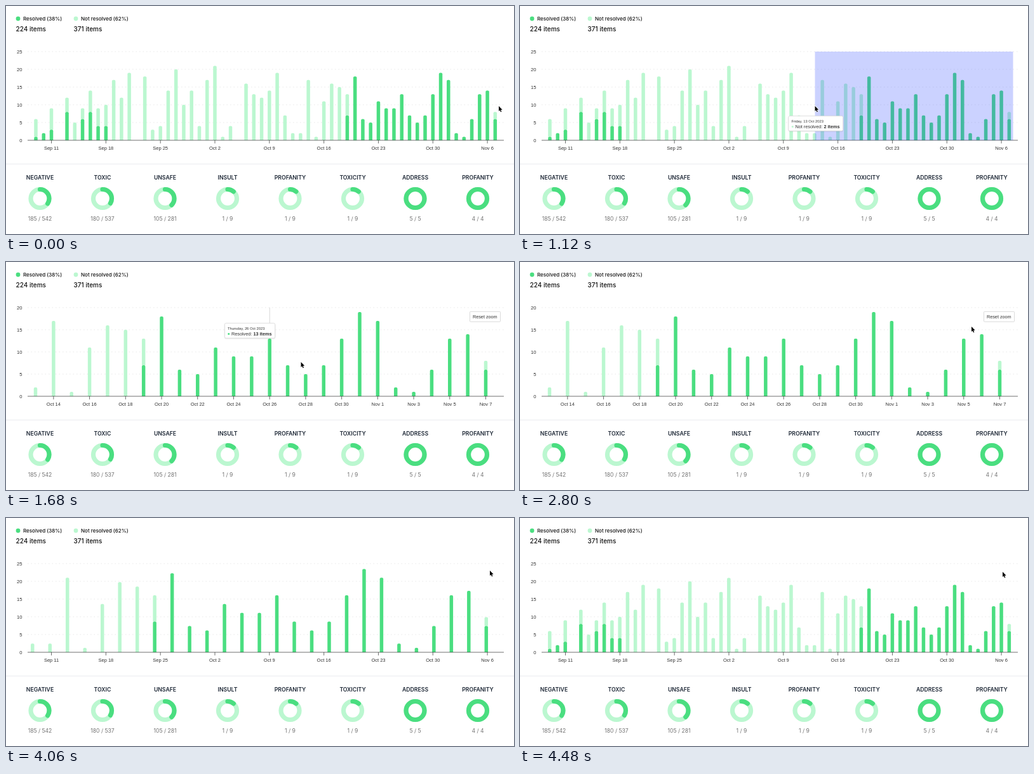
An HTML page with a canvas for the animation above (4.55 s loop, 800 by 360 pixels).

```html
<!DOCTYPE html>
<html lang="en">
<head>
<meta charset="utf-8">
<title>Moderation dashboard</title>
<style>
  html, body { margin: 0; width: 100%; height: 100%; overflow: hidden; background: #fff; }
  canvas { display: block; width: 800px; height: 360px; }
</style>
</head>
<body>
<canvas id="stage"></canvas>
<script>
const W = 800, H = 360, LOOP = 4550, STEP = 70;
const DARK = '#4ade80', LIGHT = '#bbf7d0', INK = '#333';
const SANS = '"Liberation Sans", Arial, sans-serif', UI = 'Inter, sans-serif';
const PLOT = { left: 34, right: 784, top: 72, bottom: 212 };

// Moments on the timeline, in ms
const DRAG = 70, DROP = 1130, ZOOM_IN = 1150, RESET = 3985, ZOOM_TIME = 500;

// Items per day, starting on 9 September 2023
const totals = [6, 2, 9, 0, 12, 5, 9, 14, 9, 10, 17, 12, 19, 0, 18, 3, 4, 14, 20, 10,
  14, 4, 17, 21, 1, 4, 0, 16, 13, 12, 14, 19, 7, 2, 2, 17, 1, 11, 16, 15,
  13, 18, 6, 5, 11, 9, 9, 13, 7, 5, 7, 13, 19, 17, 2, 1, 6, 13, 14, 8];
const partial = { 0: 1, 1: 2, 2: 3, 4: 8, 6: 6, 7: 8, 8: 4, 9: 4, 40: 7, 59: 6 };
const resolved = totals.map((n, i) => partial[i] ?? (i > 40 ? n : 0));

const FULL = { x0: 47, dx: 12.26, dy: 5.6, max: 25, first: 2, every: 7 };
const ZOOMED = { x0: 46.5 - 34 * 28.36, dx: 28.36, dy: 7, max: 20, first: 35, every: 2 };

const gauges = [['NEGATIVE', 185, 542], ['TOXIC', 180, 537], ['UNSAFE', 105, 281], ['INSULT', 1, 9],
  ['PROFANITY', 1, 9], ['TOXICITY', 1, 9], ['ADDRESS', 5, 5], ['PROFANITY', 4, 4]];

const canvas = document.getElementById('stage');
const ctx = canvas.getContext('2d');
const ratio = window.devicePixelRatio || 1;
canvas.width = W * ratio;
canvas.height = H * ratio;

const clamp = (v, a = 0, b = 1) => Math.min(b, Math.max(a, v));
const mix = (a, b, p) => a + (b - a) * p;
const sine = u => (1 - Math.cos(Math.PI * clamp(u))) / 2;
const span = (t, from, to) => clamp((t - from) / (to - from));

const dateOf = i => new Date(Date.UTC(2023, 8, 9 + i));
const format = (i, options) => dateOf(i).toLocaleDateString('en-US', { timeZone: 'UTC', ...options });
const shortDate = i => format(i, { month: 'short', day: 'numeric' });
const longDate = i =>
  `${format(i, { weekday: 'long' })}, ${dateOf(i).getUTCDate()} ${format(i, { month: 'short' })} 2023`;

function text(str, x, y, font, color = INK, align = 'left') {
  ctx.font = font;
  ctx.fillStyle = color;
  ctx.textAlign = align;
  ctx.fillText(str, x, y);
}

function line(x1, y1, x2, y2, color, width) {
  ctx.strokeStyle = color;
  ctx.lineWidth = width;
  ctx.beginPath();
  ctx.moveTo(x1, y1);
  ctx.lineTo(x2, y2);
  ctx.stroke();
}

function dot(x, y, r, color) {
  ctx.fillStyle = color;
  ctx.beginPath();
  ctx.arc(x, y, r, 0, Math.PI * 2);
  ctx.fill();
}

function box(x, y, w, h, r, fill, stroke) {
  ctx.beginPath();
  ctx.roundRect(x, y, w, h, r);
  ctx.fillStyle = fill;
  ctx.fill();
  if (stroke) {
    ctx.strokeStyle = stroke;
    ctx.lineWidth = 0.7;
    ctx.stroke();
  }
}

function cursorAt(t) {
  if (t < 1750) return { x: 464.5 + 311.5 * (1 - span(t, DRAG, 888)) ** 2, y: 158 };
  const across = sine(span(t, 1750, 2450));
  const up = sine(span(t, 3000, 3430));
  const rest = sine(span(t, 4060, 4480));
  return {
    x: mix(464.5, 711, across) + 51 * up - 2 * rest,
    y: mix(157.5, 102, across) - 19 * up + 2 * rest
  };
}

function viewAt(t) {
  const p = sine((t - ZOOM_IN) / ZOOM_TIME) - sine((t - RESET) / ZOOM_TIME);
  return {
    x0: mix(FULL.x0, ZOOMED.x0, p),
    dx: mix(FULL.dx, ZOOMED.dx, p),
    dy: mix(FULL.dy, ZOOMED.dy, p)
  };
}

function hoverAt(t) {
  if (t >= DROP && t < 1548) return 43;
  if (t >= 1548 && t < 1790) return 47;
  const view = t < DROP ? FULL : ZOOMED;
  return clamp(Math.round((cursorAt(t - 40).x - view.x0) / view.dx), 0, totals.length - 1);
}

function anchorAt(t) {
  const view = t < DROP ? FULL : ZOOMED, i = hoverAt(t);
  return { i, x: view.x0 + view.dx * i, y: PLOT.bottom - view.dy * totals[i] - 27 };
}

// The tooltip trails its anchor with exponential smoothing
function tooltipAt(t) {
  const pos = anchorAt(DRAG);
  for (let s = DRAG; s <= t; s += 10) {
    const goal = anchorAt(s);
    pos.x = mix(goal.x, pos.x, 0.914);
    pos.y = mix(goal.y, pos.y, 0.805);
    pos.i = goal.i;
  }
  return pos;
}

function drawLegend() {
  const items = [[16, DARK, 'Resolved (38%)', '224 items'], [107, LIGHT, 'Not resolved (62%)', '371 items']];
  for (const [x, color, name, count] of items) {
    dot(x + 3, 20, 3.4, color);
    text(name, x + 11, 23, `500 8px ${UI}`, '#111');
    text(count, x - 0.4, 40, `500 10px ${UI}`, '#111');
  }
}

function drawGrid(axis) {
  ctx.setLineDash([1.5, 4]);
  for (let n = 0; n <= axis.max; n += 5) {
    const y = PLOT.bottom - n * axis.dy;
    if (n) line(PLOT.left, y, PLOT.right, y, '#dedede', 0.7);
    text(n, 25.5, y + 3, `7.6px ${SANS}`, INK, 'right');
  }
  ctx.setLineDash([]);
}

function drawBars(view) {
  const bar = (x, from, to, color) =>
    box(x - 2.75, PLOT.bottom - to * view.dy, 5.5, (to - from) * view.dy, [2, 2, 0, 0], color);
  ctx.save();
  ctx.beginPath();
  ctx.rect(PLOT.left, PLOT.top - 1, PLOT.right - PLOT.left, PLOT.bottom - PLOT.top + 1);
  ctx.clip();
  totals.forEach((n, i) => {
    const x = view.x0 + view.dx * i, done = resolved[i];
    if (n > done) bar(x, done, n, LIGHT);
    if (done) bar(x, 0, done, DARK);
  });
  ctx.restore();
}

function drawAxis(axis) {
  line(PLOT.left, 212, PLOT.right, 212, INK, 0.7);
  for (let i = axis.first; i < totals.length; i += axis.every) {
    const x = axis.x0 + axis.dx * i;
    line(x, 212, x, 217, INK, 0.7);
    text(shortDate(i), x, 227, `7.5px ${SANS}`, INK, 'center');
  }
}

function drawSelection(t) {
  const x = cursorAt(t - 21).x;
  ctx.fillStyle = 'rgba(51, 78, 255, 0.25)';
  ctx.fillRect(x, PLOT.top, 776.5 - x, PLOT.bottom - PLOT.top);
}

function drawTooltip(t) {
  const { i, x, y } = tooltipAt(t);
  const done = resolved[i];
  const label = done ? 'Resolved: ' : 'Not resolved: ';
  const value = `${done || totals[i]} items`;
  const plain = `7.3px ${SANS}`, bold = `bold 7.3px ${SANS}`, small = `5.8px ${SANS}`;
  const date = longDate(i);
  const measure = (str, font) => { ctx.font = font; return ctx.measureText(str).width; };
  const labelW = measure(label, plain);
  const w = Math.max(measure(date, small), labelW + measure(value, bold) + 6) + 9.5;
  const left = clamp(x - w / 2, 4, 792 - w);

  ctx.save();
  ctx.shadowColor = 'rgba(0, 0, 0, 0.18)';
  ctx.shadowBlur = 2 * ratio;
  ctx.shadowOffsetY = 0.7 * ratio;
  box(left, y, w, 23.5, 2, 'rgba(255, 255, 255, 0.95)');
  ctx.restore();
  box(left, y, w, 23.5, 2, '#fff', '#d4d4d4');
  text(date, left + 4.5, y + 10.2, small);
  dot(left + 6.3, y + 16.8, 1.5, done ? DARK : LIGHT);
  text(label, left + 10.5, y + 19, plain);
  text(value, left + 10.5 + labelW, y + 19, bold);
}

function drawButton(t) {
  const { x, y } = cursorAt(t);
  const over = x > 730 && y < 95;
  box(730.5, 78.3, 48, 16, 1, over ? '#e6e6e6' : '#fff', '#ccc');
  text('Reset zoom', 754.3, 89, `7.25px ${SANS}`, INK, 'center');
}

function drawGauges() {
  line(0, 249.5, W, 249.5, '#e5e7eb', 0.8);
  gauges.forEach(([name, done, all], k) => {
    const x = 53.5 + 98.5 * k, y = 304, top = -Math.PI / 2;
    const arc = (part, color) => {
      ctx.strokeStyle = color;
      ctx.beginPath();
      ctx.arc(x, y, 14.5, top, top + Math.PI * 2 * part);
      ctx.stroke();
    };
    text(name, x, 273.6, `600 8.7px ${UI}`, '#1f2937', 'center');
    ctx.lineWidth = 7.2;
    ctx.lineCap = 'round';
    arc(1, LIGHT);
    arc(done / all, DARK);
    ctx.lineCap = 'butt';
    text(`${done} / ${all}`, x, 339.2, `8.6px ${UI}`, '#737373', 'center');
  });
}

function drawCursor({ x, y }) {
  const shape = [[0, 0], [0, 8], [1.8, 6.4], [3.1, 9.4], [4.4, 8.8], [3.1, 5.9], [5.6, 5.7]];
  ctx.beginPath();
  shape.forEach(([dx, dy]) => ctx.lineTo(x + dx, y + dy));
  ctx.closePath();
  ctx.lineJoin = 'round';
  ctx.strokeStyle = '#fff';
  ctx.lineWidth = 1.2;
  ctx.stroke();
  ctx.fillStyle = '#000';
  ctx.fill();
}

function draw(t) {
  const zoomed = t >= ZOOM_IN && t < RESET;
  const axis = zoomed ? ZOOMED : FULL;
  const tipAlpha = t > DRAG ? 1 - span(t, 2450, 2660) : 0;

  ctx.setTransform(ratio, 0, 0, ratio, 0, 0);
  ctx.fillStyle = '#fff';
  ctx.fillRect(0, 0, W, H);
  drawLegend();
  drawGrid(axis);
  if (zoomed && tipAlpha > 0) {
    const x = anchorAt(t).x;
    ctx.globalAlpha = tipAlpha;
    line(x, PLOT.top, x, PLOT.bottom, '#ccc', 0.8);
    ctx.globalAlpha = 1;
  }
  drawBars(viewAt(t));
  drawAxis(axis);
  if (t > DRAG && t < DROP) drawSelection(t);
  if (zoomed) drawButton(t);
  if (tipAlpha > 0) {
    ctx.globalAlpha = tipAlpha;
    drawTooltip(t);
    ctx.globalAlpha = 1;
  }
  drawGauges();
  drawCursor(cursorAt(t));
}

let start;
function tick(now) {
  start ??= now;
  const t = (now - start) % LOOP;
  draw(Math.floor(t / STEP) * STEP);
  requestAnimationFrame(tick);
}
requestAnimationFrame(tick);
</script>
</body>
</html>
```
